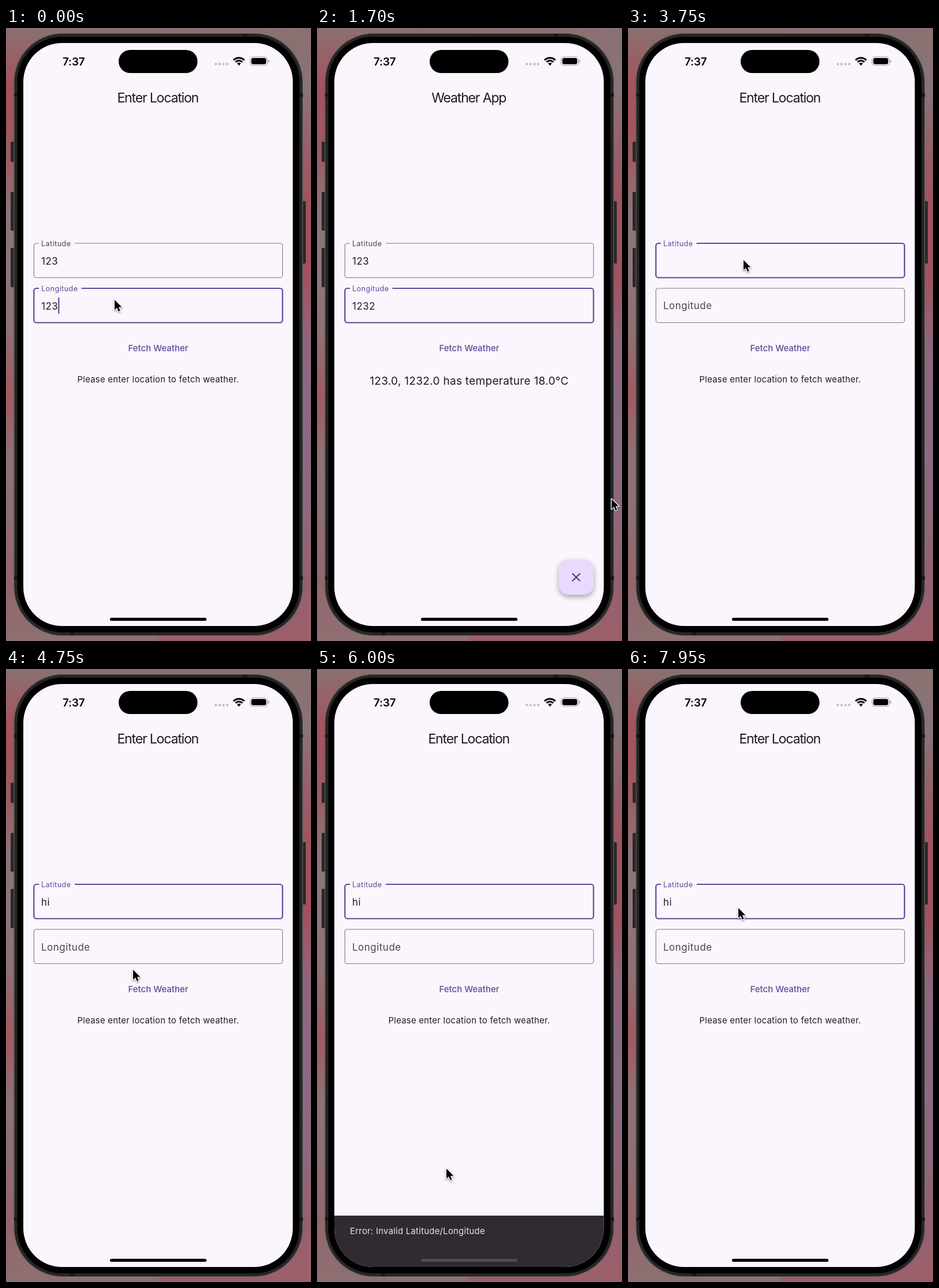
Recreate the animation shown at these times as an HTML page with a canvas. Size 528 by 1062 pixels, loop 8000 ms.

```html
<!DOCTYPE html>
<html lang="en">
<head>
<meta charset="utf-8">
<title>Enter Location</title>
<style>
html, body { margin: 0; width: 100%; height: 100%; overflow: hidden; }
canvas { display: block; width: 528px; height: 1062px; }
</style>
</head>
<body>
<canvas id="stage" width="528" height="1062"></canvas>
<script>
const ctx = document.getElementById('stage').getContext('2d');
const LOOP = 8000, FETCH = 850, RESULT = 1050, RESET = 2745, FOCUS = 3600, RETRY = 5340, SNACK = 5417, RELEASE = 6720;
const SURFACE = '#fbf5fd', INK = '#1d1b20', GREY = '#49454f', PURPLE = '#594a96';

// Pointer stops: time, x, y
const POINTER = [
  [0, 188, 471], [200, 188, 471], [750, 232, 552], [1100, 232, 552], [1650, 510, 816],
  [1950, 510, 816], [2500, 440, 952], [2900, 440, 952], [3450, 200, 402], [4100, 200, 402],
  [4700, 220, 521], [4800, 220, 521], [5200, 229, 553], [5550, 229, 553], [6250, 222, 993],
  [6650, 220, 1032], [6800, 219, 1046], [7050, 219, 1046], [7800, 191, 414], [8000, 191, 414]
];

const clamp = v => Math.max(0, Math.min(1, v));
const ramp = (t, start, span) => clamp((t - start) / span);
const mix = (a, b, p) => a + (b - a) * p;

// cubic-bezier(.4, 0, .2, 1)
function ease(x) {
  let lo = 0, hi = 1, u = 0.5;
  for (let i = 0; i < 20; i++) {
    u = (lo + hi) / 2;
    const v = 1 - u;
    if (1.2 * u * v * v + 0.6 * u * u * v + u ** 3 < x) lo = u; else hi = u;
  }
  return u * u * (3 - 2 * u);
}

function pointerAt(t) {
  const i = POINTER.findIndex((stop, k) => k && t <= stop[0]);
  const [t0, x0, y0] = POINTER[i - 1], [t1, x1, y1] = POINTER[i];
  const p = ramp(t, t0, t1 - t0), s = p * p * (3 - 2 * p);
  return [mix(x0, x1, s), mix(y0, y1, s)];
}

function roundPath(x, y, w, h, r) {
  ctx.beginPath();
  ctx.roundRect(x, y, w, h, r);
}

function box(x, y, w, h, r, fill) {
  roundPath(x, y, w, h, r);
  ctx.fillStyle = fill;
  ctx.fill();
}

function text(str, x, y, size, { color = INK, spacing = 0.3, weight = 400, align = 'left' } = {}) {
  ctx.font = `${weight} ${size}px Inter, Roboto, sans-serif`;
  ctx.letterSpacing = spacing + 'px';
  ctx.textAlign = align;
  ctx.fillStyle = color;
  ctx.fillText(str, x + (align === 'center' ? spacing / 2 : 0), y);
}

function backdrop(x, colors) {
  const g = ctx.createLinearGradient(0, 0, 0, 1062);
  colors.forEach((c, i) => g.addColorStop(i / (colors.length - 1), c));
  ctx.fillStyle = g;
  ctx.fillRect(x, 0, 264, 1062);
}

function drawPhone() {
  backdrop(0, ['#8a7071', '#a5525c', '#9c5a62', '#8d7476', '#8d7678', '#8f7073', '#a05a62', '#8e7275', '#8d6f74', '#94666c', '#8d7073']);
  backdrop(264, ['#8a7071', '#877577', '#96606a', '#a1525d', '#a0525e', '#92647a', '#8b6983', '#8c6a84', '#8e687b', '#95616f', '#9c606a']);
  [[8, 197, 35], [8, 284, 67], [8, 381, 68], [512, 300, 108]].forEach(([x, y, h]) => box(x, y, 7, h, 1.5, '#2a2828'));
  box(14, 9.5, 499.5, 1043, 84, '#262525');
  ctx.strokeStyle = '#5d5959';
  ctx.lineWidth = 1.2;
  ctx.stroke();
  [[410, 10, 7, 5], [111, 1047, 7, 5], [14, 113, 6, 6], [508, 113, 6, 6], [14, 950, 6, 6], [508, 950, 6, 6]]
    .forEach(b => box(...b, 0, '#171616'));
  box(19.5, 15, 488.5, 1032, 78, '#000');
  box(30, 26, 466.5, 1010, 67, SURFACE);
}

function drawStatus() {
  text('7:37', 98, 64.5, 18.8, { color: '#000', weight: 600, spacing: -0.1 });
  box(195, 38, 136.5, 40, 20, '#000');
  for (let i = 0; i < 4; i++) box(361 + i * 6.6, 60.3, 4.4, 4.4, 2.2, '#c4bfc7');

  ctx.strokeStyle = '#000';
  ctx.lineWidth = 3;
  [12.8, 8].forEach(r => {
    ctx.beginPath();
    ctx.arc(403.3, 64.5, r, -Math.PI * 0.76, -Math.PI * 0.24);
    ctx.stroke();
  });
  ctx.beginPath();
  ctx.moveTo(403.3, 65.2);
  ctx.arc(403.3, 64.5, 4.6, -Math.PI * 0.76, -Math.PI * 0.24);
  ctx.fillStyle = '#000';
  ctx.fill();

  roundPath(422.5, 50, 30, 14.8, 4.6);
  ctx.strokeStyle = '#a19da4';
  ctx.lineWidth = 1.1;
  ctx.stroke();
  box(424.6, 52.1, 25.8, 10.6, 3, '#000');
  box(453.8, 55, 1.8, 5, [0, 2, 2, 0], '#a19da4');
}

function drawField(y, label, labelWidth, value, focused, lift, caret) {
  const x = 48.3, w = 430.4, h = 59.5;
  roundPath(x, y, w, h, 4.3);
  ctx.strokeStyle = focused ? PURPLE : '#7c7781';
  ctx.lineWidth = focused ? 2.2 : 1.1;
  ctx.stroke();
  if (lift > 0) {
    ctx.fillStyle = SURFACE;
    ctx.fillRect(57, y - 2, labelWidth * lift, 4);
  }
  text(label, 61, y + mix(36.5, 5, lift), mix(16.9, 12.65, lift),
    { color: focused ? PURPLE : GREY, spacing: mix(0.54, 0.42, lift) });
  text(value, 61, y + 36.5, 16.9, { spacing: 0.54 });
  if (caret) {
    const end = value ? 61 + ctx.measureText(value).width : 61;
    box(end, y + 16, 2.2, 28, 1, PURPLE);
  }
}

function drawButton(t) {
  const start = t < 3000 ? FETCH : RETRY;
  const age = t - start;
  if (age > 0 && age < 550) {
    ctx.save();
    roundPath(196, 533, 135, 43, 21.5);
    ctx.clip();
    ctx.globalAlpha = ramp(age, 0, 75) * (1 - ramp(age, 250, 300));
    ctx.beginPath();
    ctx.arc(229, 556, mix(20, 108, ease(ramp(age, 0, 290))), 0, 7);
    ctx.fillStyle = '#e9dff3';
    ctx.fill();
    ctx.restore();
  }
  text('Fetch Weather', 263.5, 560, 14.8, { color: PURPLE, weight: 500, spacing: 0.1, align: 'center' });
}

function drawFab(t) {
  const scale = Math.min(ramp(t, RESULT, 200), 1 - ramp(t, RESET, 152));
  if (scale <= 0) return;
  ctx.save();
  ctx.translate(448.7, 951.5);
  ctx.scale(scale, scale);
  ctx.shadowColor = 'rgba(0,0,0,.32)';
  ctx.shadowBlur = 9;
  ctx.shadowOffsetY = 4;
  box(-30.4, -30.4, 60.8, 60.8, 17.3, t > 2650 ? '#d0c2ee' : '#e8dafc');
  ctx.shadowColor = 'transparent';
  ctx.beginPath();
  ctx.moveTo(-6.8, -6.8);
  ctx.lineTo(6.8, 6.8);
  ctx.moveTo(6.8, -6.8);
  ctx.lineTo(-6.8, 6.8);
  ctx.strokeStyle = '#4f378b';
  ctx.lineWidth = 2.1;
  ctx.stroke();
  ctx.restore();
}

function drawSnack(t, pointerY) {
  let top = mix(1036, 947, ease(ramp(t, SNACK, 250)));
  if (t > 6250) top = 947 + Math.max(0, Math.min(pointerY, 1039) - 993);
  top = mix(top, 1036, ramp(t, RELEASE, 120));
  const shown = top < 1035.9;
  if (shown) {
    ctx.save();
    roundPath(30, 26, 466.5, 1010, 67);
    ctx.clip();
    ctx.fillStyle = '#2f2b31';
    ctx.fillRect(30, top, 467, 90);
    text('Error: Invalid Latitude/Longitude', 57, top + 31.5, 14.8, { color: '#e9e4ec' });
    ctx.restore();
  }
  box(180, 1021.7, 167, 5.4, 2.7, shown && top < 1022 ? '#4e4b51' : '#000');
}

function drawPointer(x, y) {
  ctx.save();
  ctx.translate(x, y);
  ctx.beginPath();
  [[0, 0], [0, 17.4], [4, 13.6], [6.8, 20], [9.6, 18.8], [6.9, 12.6], [12.4, 12.4]].forEach(p => ctx.lineTo(...p));
  ctx.closePath();
  ctx.lineJoin = 'round';
  ctx.strokeStyle = '#fff';
  ctx.lineWidth = 2.6;
  ctx.shadowColor = 'rgba(0,0,0,.4)';
  ctx.shadowBlur = 3;
  ctx.shadowOffsetY = 1.5;
  ctx.stroke();
  ctx.shadowColor = 'transparent';
  ctx.fillStyle = '#000';
  ctx.fill();
  ctx.restore();
}

function draw(t) {
  const [px, py] = pointerAt(t);
  const fetched = t >= RESULT && t < RESET;
  const onLatitude = t >= FOCUS;
  const caret = t < 200 || (t - 200) % 1000 < 500;
  const latitude = t < RESET ? '123' : t < 4000 ? '' : t < 4200 ? 'h' : 'hi';
  const longitude = t < 200 ? '123' : t < RESET ? '1232' : '';
  const latLift = t < FOCUS ? 1 - ease(ramp(t, RESET, 167)) : ease(ramp(t, FOCUS, 167));
  const lonLift = 1 - ease(ramp(t, FOCUS, 167));

  drawPhone();
  drawStatus();
  text(fetched ? 'Weather App' : 'Enter Location', 263.3, 129, 23.1, { spacing: -1.2, align: 'center' });
  drawField(373, 'Latitude', 62, latitude, onLatitude, latLift, onLatitude && caret);
  drawField(451, 'Longitude', 73.5, longitude, !onLatitude, lonLift, !onLatitude && caret);
  drawButton(t);
  if (fetched) text('123.0, 1232.0 has temperature 18.0°C', 263.3, 618.3, 19, { align: 'center' });
  else text('Please enter location to fetch weather.', 263.3, 614, 14.8, { align: 'center' });
  drawFab(t);
  drawSnack(t, py);
  drawPointer(px, py);
}

const begin = performance.now();
function tick() {
  draw((performance.now() - begin) % LOOP);
  requestAnimationFrame(tick);
}
tick();
</script>
</body>
</html>
```
